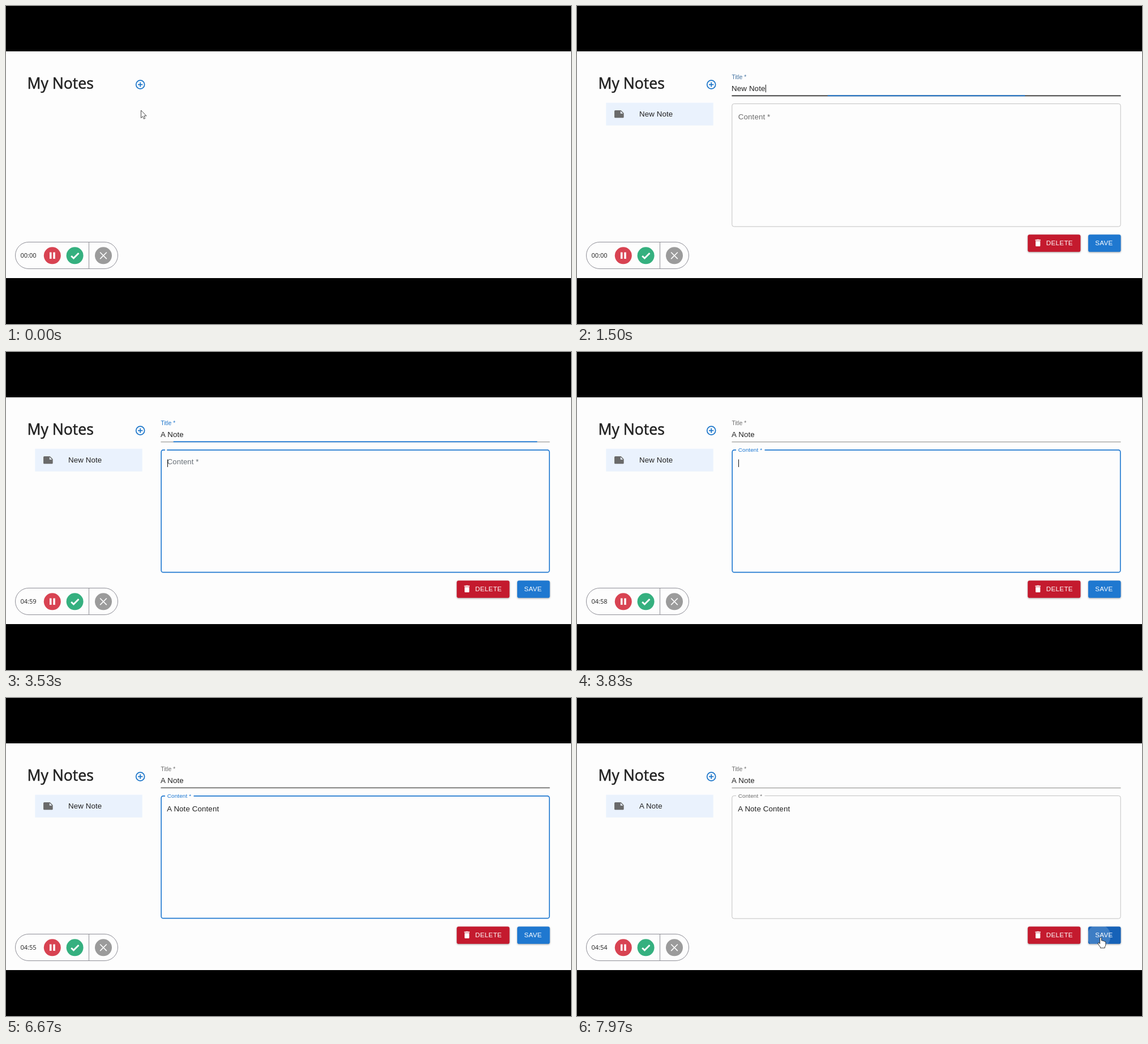
An HTML page that plays this animation: 998x561 px, repeating every 8000 ms.

```html
<!DOCTYPE html>
<html lang="en">
<head>
<meta charset="utf-8">
<title>My Notes</title>
<style>
  html, body { margin: 0; width: 100%; height: 100%; overflow: hidden; background: #000; }
  svg { display: block; }
  text { font: 13.3px "Liberation Sans", Arial, sans-serif; letter-spacing: .00938em; fill: #212121; white-space: pre; }
  .small { font-size: 10px; }
  .heading { font: 26.6px "Open Sans", "Noto Sans", sans-serif; letter-spacing: 0; stroke: #212121; stroke-width: .55; }
  .clock { font: 11.1px "Open Sans", "Noto Sans", sans-serif; letter-spacing: 0; }
  .button { font-size: 11.65px; letter-spacing: .02857em; fill: #fff; }
  .raised { filter: drop-shadow(0 1.5px 1.5px rgba(0, 0, 0, .35)); }
  .icon { fill: none; stroke: #fff; stroke-width: 2; }
</style>
</head>
<body>
<svg width="100%" height="100%" viewBox="0 0 998 561">
  <defs>
    <clipPath id="saveClip"><rect x="903" y="403" width="58" height="31" rx="3.5"/></clipPath>
  </defs>
  <rect width="998" height="561"/>
  <rect y="80" width="998" height="400" fill="#fdfdfd"/>

  <text class="heading" x="37.4" y="146">My Notes</text>
  <circle id="addHover" cx="237" cy="138.5" r="16.6" fill="#1976d2"/>
  <circle id="addRipple" cx="237" cy="138.5" fill="#1976d2"/>
  <g fill="none" stroke="#1873c8" stroke-width="1.7">
    <circle cx="237.2" cy="138.6" r="7.5"/>
    <path d="M233 138.6h8.4M237.2 134.4v8.4"/>
  </g>

  <g id="editor">
    <rect x="51.3" y="170.7" width="189.4" height="40" fill="#eaf2fd"/>
    <path transform="translate(64.4 180.7) scale(.83)" fill="#6a6a6a" fill-rule="evenodd"
      d="M22 10l-6-6H4c-1.1 0-2 .9-2 2v12c0 1.1.9 2 2 2h16c1.1 0 2-.9 2-2zM15 5.5l5.5 5.5H15z"/>
    <text id="item" x="110" y="195"></text>

    <text id="titleLabel" class="small" x="273.4" y="128.6">Title *</text>
    <rect id="selection" y="138" height="15.5" fill="#1a78d6"/>
    <text id="title" x="273.1" y="150.3"></text>
    <rect x="273.5" y="158.2" width="687" height="1" fill="#868682"/>
    <rect id="titleHover" x="273.5" y="157.4" width="687" height="1.8" fill="#3a3a3a"/>
    <rect id="titleFocus" y="157.4" height="1.8" fill="#1976d2"/>

    <rect id="outline" rx="3.5" fill="none"/>
    <rect id="notch" x="281" y="170.5" height="4" fill="#fdfdfd"/>
    <text id="contentLabel">Content *</text>
    <text id="content" x="284.3" y="200.2"></text>
    <rect id="caret" width="1" height="13.5" fill="#111"/>

    <rect class="raised" x="796.2" y="403.2" width="93.2" height="30.6" rx="3.4" fill="#c41a2e"/>
    <path transform="translate(805.9 409.6) scale(.69)" fill="#fff"
      d="M6 19c0 1.1.9 2 2 2h8c1.1 0 2-.9 2-2V7H6zM19 4h-3.5l-1-1h-5l-1 1H5v2h14z"/>
    <text class="button" x="828.7" y="422.3">DELETE</text>
    <rect id="save" class="raised" x="903" y="403.2" width="57.6" height="30.6" rx="3.4"/>
    <circle id="saveRipple" cx="922" cy="420" fill="#fff" clip-path="url(#saveClip)"/>
    <text class="button" x="915.2" y="422.3">SAVE</text>
  </g>

  <rect x="16.5" y="416.5" width="181" height="47" rx="23.5" fill="#fdfdfd" stroke="#8e8e96"/>
  <path d="M146.5 417v46" stroke="#8e8e96"/>
  <text id="clock" class="clock" x="25.4" y="444.3"></text>
  <circle cx="81.8" cy="440.3" r="15" fill="#d84352"/>
  <path d="M77 434.5h3.5v11.5H77zM83.3 434.5h3.5v11.5h-3.5z" fill="#fff"/>
  <circle cx="121.6" cy="440.3" r="15" fill="#35b07f"/>
  <path class="icon" d="M115.2 441l4.2 4 9-9" style="stroke-width:3"/>
  <circle cx="172" cy="440.3" r="15" fill="#9b9b9b"/>
  <path class="icon" d="M166.2 434.5l11.6 11.6m0-11.6l-11.6 11.6" style="stroke-width:1.6"/>

  <g id="pointer" stroke-linejoin="round">
    <path id="arrow" d="M0 0V13.5L3 10.7 5 15.2 7.2 14.2 5.3 9.9H9.6Z" fill="#fff" stroke="#333" stroke-width=".9"/>
    <path id="hand" fill="#fff" stroke="#222" stroke-width=".9"
      d="M-1.4 1.2Q0-.8 1.4 1.2V6Q2.8 5 4 6.8 5.4 5.9 6.5 7.5 8.7 7 8.9 9.2V13.2Q8.6 16 7.3 17V19H-.6V17.3Q-2.8 15-4.7 11.2-5 9-2.9 9.8L-1.4 11.6Z"/>
  </g>
</svg>
<script>
const LOOP = 8000, BLUE = '#1976d2', LABEL = '#6c6c6c';
const EDITOR_OPEN = 790, TITLE_FOCUS = 1400, CONTENT_FOCUS = 3500, SAVE_PRESS = 7720, SAVED = 7870;
const titleKeys = [2500, 2640, 2770, 2880, 2990, 3100];
const contentKeys = [4440, 4560, 4700, 4850, 5000, 5100, 5200, 5290, 5380, 5480, 5580, 5720, 5830, 5940];

// Pointer stops: time, x, y
const pointerPath = [
  [0, 238.5, 184], [80, 238.5, 184], [400, 238, 139], [740, 238, 139], [900, 330, 146],
  [1350, 348, 147], [1520, 348, 147], [2000, 150, 152], [2200, 55, 153], [6420, 55, 153],
  [6640, 420, 147], [6780, 520, 170], [7000, 700, 300], [7320, 925, 422], [8000, 925, 422]
];

const el = {};
document.querySelectorAll('[id]').forEach(node => el[node.id] = node);
const set = (node, attrs) => { for (const k in attrs) node.setAttribute(k, attrs[k]); };
const show = (node, on) => node.style.display = on ? '' : 'none';
const ramp = (t, start, length = 200) => Math.min(1, Math.max(0, (t - start) / length));
const ease = k => k * k * (3 - 2 * k);
const pulse = (t, on, off, length = 200) => ease(ramp(t, on, length)) * (1 - ease(ramp(t, off, length)));
const mix = (a, b, k) => `color-mix(in srgb, ${b} ${k * 100}%, ${a})`;
const typed = (text, keys, t) => text.slice(0, keys.filter(k => k <= t).length);

function pointerAt(t) {
  const i = pointerPath.findIndex(p => p[0] > t);
  const [a, b] = [pointerPath[i - 1], pointerPath[i]];
  const k = ease((t - a[0]) / (b[0] - a[0]));
  return [a[1] + (b[1] - a[1]) * k, a[2] + (b[2] - a[2]) * k];
}

function drawTitle(t) {
  const focus = pulse(t, TITLE_FOCUS, CONTENT_FOCUS);
  const hover = Math.max(pulse(t, 820, 1600), pulse(t, 6570, 6770));
  const selecting = t >= 1550 && t < titleKeys[0];
  el.titleLabel.style.fill = mix(LABEL, BLUE, focus);
  set(el.titleHover, { opacity: hover });
  set(el.titleFocus, { x: 617 - 343.5 * focus, width: 687 * focus });

  const name = t < titleKeys[0] ? 'New Note' : typed('A Note', titleKeys, t);
  const keep = selecting ? Math.round(8 * (1 - ramp(t, 1550, 350))) : name.length;
  el.title.innerHTML = name.slice(0, keep) + `<tspan style="fill:#fff">${name.slice(keep)}</tspan>`;
  const from = keep ? el.title.getSubStringLength(0, keep) : 0;
  set(el.selection, { x: 273.3 + from, width: selecting ? el.title.getComputedTextLength() - from : 0 });
}

function drawContent(t) {
  const float = t < CONTENT_FOCUS ? 0 : ease(ramp(t, CONTENT_FOCUS));
  const focused = t >= CONTENT_FOCUS && t < SAVE_PRESS;
  const inset = focused ? .9 : .5;
  set(el.outline, {
    x: 273.3 + inset, y: 172 + inset, width: 687.4 - 2 * inset, height: 217.6 - 2 * inset,
    stroke: focused ? '#2079d0' : '#c2c2c2', 'stroke-width': focused ? 1.66 : 1
  });
  set(el.notch, { width: 50.5 * float });
  set(el.contentLabel, { transform: `translate(284.8 ${200 - 24.4 * float}) scale(${1 - .25 * float})` });
  el.contentLabel.style.fill = mix(LABEL, BLUE, pulse(t, CONTENT_FOCUS, SAVE_PRESS, 180));
  el.content.textContent = typed('A Note Content', contentKeys, t);
}

function drawCaret(t) {
  const inContent = t >= CONTENT_FOCUS;
  const field = inContent ? el.content : el.title;
  const last = Math.max(...[TITLE_FOCUS, CONTENT_FOCUS, ...titleKeys, ...contentKeys].filter(k => k <= t));
  const active = t >= TITLE_FOCUS && t < SAVE_PRESS && !(t >= 1550 && t < titleKeys[0]);
  show(el.caret, active && Math.floor((t - last) / 530) % 2 === 0);
  set(el.caret, {
    x: (inContent ? 285 : 273.5) + field.getComputedTextLength(),
    y: inContent ? 189.5 : 138.8
  });
}

function drawPointer(t) {
  const [x, y] = pointerAt(t);
  const onAdd = Math.hypot(x - 237, y - 138.5) < 16.6;
  const onSave = x > 903 && y > 403;
  const overField = t >= EDITOR_OPEN && x > 273 && x < 961 && y > 136 && y < 390;
  const dragging = t > TITLE_FOCUS && t < 2230;
  const typing = t > 2620 && t < 6420;
  show(el.pointer, !overField && !dragging && !typing);
  show(el.hand, onAdd || onSave);
  show(el.arrow, !onAdd && !onSave);
  set(el.pointer, { transform: `translate(${x} ${y})` });
}

function drawClock(t) {
  const left = 300 - Math.floor(Math.max(0, t - 1600) / 1000);
  el.clock.textContent = t < 1600 ? '00:00'
    : `0${Math.floor(left / 60)}:${String(left % 60).padStart(2, '0')}`;
}

function draw(t) {
  drawClock(t);
  set(el.addHover, { opacity: .06 * pulse(t, 270, 860, 250) });
  set(el.addRipple, { r: 16.6 * ease(ramp(t, 690, 400)), opacity: .2 * (1 - ramp(t, 790, 400)) });

  show(el.editor, t >= EDITOR_OPEN);
  if (t >= EDITOR_OPEN) {
    el.item.textContent = t < SAVED ? 'New Note' : 'A Note';
    drawTitle(t);
    drawContent(t);
    drawCaret(t);
    set(el.saveRipple, { r: 41 * ease(ramp(t, SAVE_PRESS, 500)), opacity: t < SAVE_PRESS ? 0 : .17 });
    el.save.style.fill = mix('#1f78d0', '#1662b8', ease(ramp(t, 7260, 250)));
  }
  drawPointer(t);
}

const start = performance.now();
(function frame() {
  draw((performance.now() - start) % LOOP);
  requestAnimationFrame(frame);
})();
</script>
</body>
</html>
```
